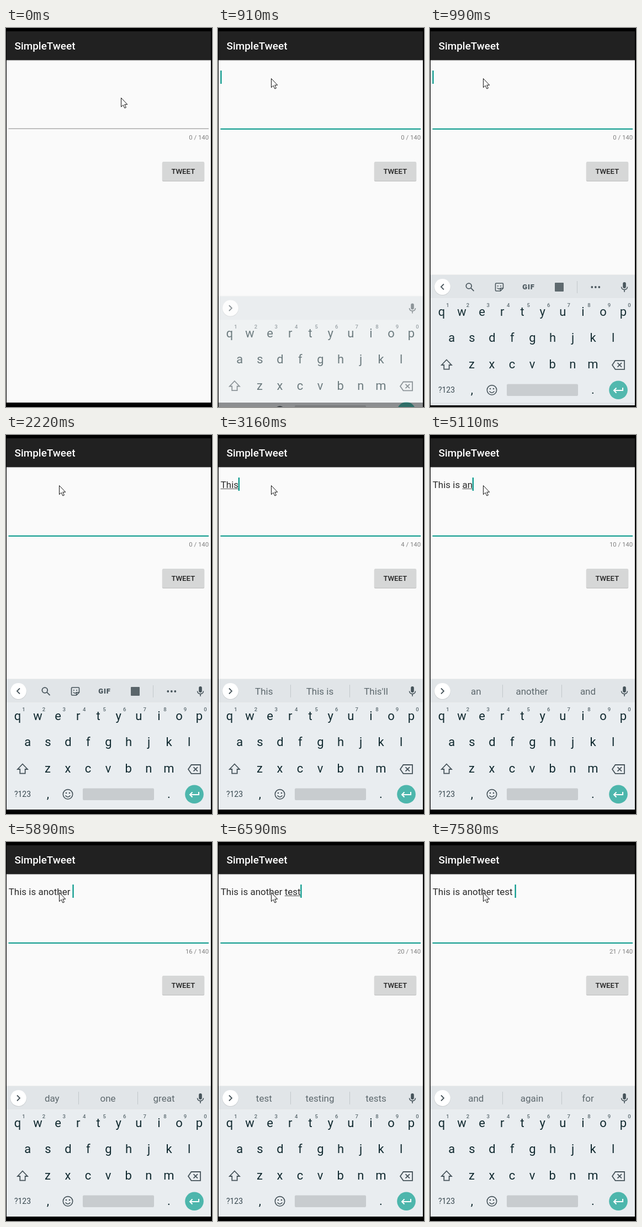
An HTML page for the animation above (8 s loop, 373x686 px).

```html
<!DOCTYPE html>
<html lang="en">
<head>
<meta charset="utf-8">
<title>Compose screen</title>
<style>
  html, body { margin: 0; width: 100%; height: 100%; overflow: hidden; background: #000; }
  svg { display: block; width: 373px; height: 686px; }
  text { font-family: Roboto, "Noto Sans", sans-serif; }
  .mid { text-anchor: middle; }
  .end { text-anchor: end; }
  .key { font-size: 22px; fill: #10292f; }
  .hint { font-size: 9.5px; font-weight: 500; fill: #59686e; }
  .word { font-size: 17px; fill: #5d686d; }
  .line { fill: none; stroke: #46535a; stroke-width: 1.8; }
  .rule { fill: none; stroke: #c2c8cb; }
</style>
</head>
<body>
<svg viewBox="0 0 373 686">
  <rect width="373" height="686"/>
  <rect x="1" y="6" width="370" height="672" fill="#fafafa"/>
  <rect x="1" y="6" width="370" height="52" fill="#212121"/>
  <rect x="1" y="58" width="370" height="1" opacity=".24"/>
  <rect x="1" y="59" width="370" height="1" opacity=".08"/>
  <text x="15.5" y="39" font-size="18.9" font-weight="500" fill="#fff">SimpleTweet</text>

  <text id="typed" x="4.7" y="95.5" font-size="17" fill="#2b2b2b"></text>
  <rect id="under" y="97" height="1" fill="#555"/>
  <rect id="caret" y="77" width="2.2" height="24" fill="#009688"/>
  <rect id="field" x="4.5" width="362.5"/>
  <text id="count" class="end" x="367" y="202" font-size="11.3" fill="#808080"></text>

  <rect x="283" y="243.5" width="76" height="34.5" rx="2" opacity=".16"/>
  <rect x="282.5" y="243" width="77" height="34" rx="2" opacity=".09"/>
  <rect x="283" y="242" width="76" height="34.5" rx="2" fill="#d6d7d7"/>
  <text class="mid" x="320.8" y="264" font-size="13.2" font-weight="500" fill="#212121">TWEET</text>

  <g id="board">
    <rect x="1" y="441" width="370" height="1" opacity=".05"/>
    <rect x="1" y="442" width="370" height="42.5" fill="#e1e5e8"/>
    <rect x="1" y="484.5" width="370" height="193.5" fill="#e9edf0"/>
    <circle cx="22.5" cy="464.3" r="14.8" opacity=".1"/>
    <circle cx="22.5" cy="463.5" r="14.4" fill="#fff"/>
    <path id="chevron" class="line"/>

    <g id="tools">
      <circle class="line" cx="70.3" cy="462" r="4.9"/>
      <path class="line" d="M74 465.7L79.5 471.2" stroke-width="2"/>
      <path class="line" d="M120 457H131Q132.500 457 132.500 458.500V466L127.500 471H120Q118.500 471 118.500 469.500V458.500Q118.500 457 120 457ZM132.500 466H127.500V471" style="stroke-width:1.6"/>
      <path class="line" d="M121.800 465.500Q125 469 128.500 465.500" style="stroke-width:1.4"/>
      <circle cx="122.800" cy="462" r="1.100" fill="#46535a"/>
      <circle cx="128" cy="462" r="1.100" fill="#46535a"/>
      <text class="mid" x="178.500" y="468" font-size="13" font-weight="900" letter-spacing=".9" fill="#46535a">GIF</text>
      <rect x="226" y="456" width="16" height="16" rx="1" fill="#5b666b"/>
      <path class="rule" d="M266.500 453V475"/>
      <g fill="#46535a">
        <circle cx="293.300" cy="464" r="1.900"/>
        <circle cx="299.800" cy="464" r="1.900"/>
        <circle cx="306.300" cy="464" r="1.900"/>
      </g>
    </g>

    <g id="words">
      <path class="rule" d="M131.500 452V475M238.500 452V475"/>
      <text class="word mid" x="83.300" y="470"></text>
      <text class="word mid" x="184.500" y="470"></text>
      <text class="word mid" x="286" y="470"></text>
    </g>

    <rect x="349.200" y="455" width="5.600" height="11" rx="2.800" fill="#46535a"/>
    <path class="line" d="M346.500 463.500Q347 468.600 352 468.600T357.500 463.500M352 468.600V473" style="stroke-width:1.600"/>

    <g id="keys"></g>
    <path class="line" d="M30 595.500L39 605H34.700V612.700H25.300V605H21Z"/>
    <path class="line" d="M335.500 597H352V612.800H335.500L330 604.900ZM339.500 601.200L347 608.700M347 601.200L339.500 608.700"/>
    <text class="mid" x="30" y="655" font-size="14" fill="#37474f">?123</text>
    <circle class="line" cx="112" cy="650.300" r="8.700" style="stroke-width:1.600"/>
    <circle cx="109" cy="648" r="1.300" fill="#46535a"/>
    <circle cx="115" cy="648" r="1.300" fill="#46535a"/>
    <path class="line" d="M107.500 652.500Q112 658 116.500 652.500" style="stroke-width:1.500"/>
    <rect x="139" y="639.500" width="129" height="21.500" rx="2" fill="#c8cccf"/>
    <circle cx="341" cy="650.300" r="16.800" fill="#4db6ac"/>
    <path d="M349 646V651H333.500M337.500 646.500L333 651L337.500 655.500" fill="none" stroke="#fff" stroke-width="2"/>
  </g>

  <path id="pointer" fill="#fff" stroke="#111" d="M.5.5V16.700L4.200 13.300L6.900 19L9.400 17.900L6.800 12.300H11.700Z"/>
</svg>

<script>
const LOOP = 8000;
const MESSAGE = 'This is another test ';

// time, characters typed, suggestions
const TYPING = [
  [0, 0, ''],
  [2310, 1, 'The|This|That'],
  [2490, 2, 'The|This|Thanks'],
  [2950, 3, 'The|This|Thanks'],
  [3010, 3, 'This|Think|Thing'],
  [3160, 4, "This|This is|This'll"],
  [3310, 5, "This|This is|This'll"],
  [3370, 5, 'is|was|one'],
  [3450, 6, 'is|in|it'],
  [3560, 7, "is|isn't|is a"],
  [3660, 8, 'the|a|my'],
  [4830, 9, 'a|and|an'],
  [5110, 10, 'an|another|and'],
  [5320, 11, 'another|an|ano'],
  [5390, 12, 'another|not|anot'],
  [5450, 13, 'another|anoth|other'],
  [5520, 13, 'another|other|anoth'],
  [5590, 14, 'another|anothe|other'],
  [5650, 15, "another|another's|other"],
  [5830, 16, "another|another's|other"],
  [5890, 16, 'day|one|great'],
  [6230, 17, 'time|thing|to'],
  [6290, 18, 'test|team|text'],
  [6470, 19, 'test|tests|testing'],
  [6590, 20, 'test|testing|tests'],
  [7520, 21, 'test|testing|tests'],
  [7580, 21, 'and|again|for']
];

// time, keyboard offset, opacity
const SLIDE = [
  [0, 0, 0],
  [910, 43.5, .6],
  [930, 27, .77],
  [960, 14, .9],
  [990, 5, .97],
  [1020, 0, 1]
];

const FOCUS = 570;
const CARET_OFF = [[0, FOCUS], [1200, 1700], [2220, 2310], [4160, 4650], [7060, 7520]];
const MOVE = { start: 30, step: 38.6, count: 14, from: [208, 126], to: [96, 91] };

const $ = id => document.getElementById(id);
const set = (el, attrs) => {
  for (const name in attrs) el.setAttribute(name, attrs[name]);
};
const at = (table, t) => table.findLast(row => row[0] <= t);
const show = (el, on) => set(el, { visibility: on ? 'visible' : 'hidden' });

function addText(label, x, y, cls) {
  const el = document.createElementNS('http://www.w3.org/2000/svg', 'text');
  set(el, { x, y, class: 'mid ' + cls });
  el.textContent = label;
  $('keys').append(el);
}

const PITCH = 36.55;
[['qwertyuiop', 21, 516], ['asdfghjkl', 39.3, 563], ['zxcvbnm', 75.5, 611]].forEach(([row, x, y]) =>
  [...row].forEach((key, i) => addText(key, x + i * PITCH, y, 'key')));
[...'1234567890'].forEach((n, i) => addText(n, 32 + i * PITCH, 500, 'hint'));
addText(',', 76, 657, 'key');
addText('.', 295, 657, 'key');

const typed = $('typed');
const words = [...$('words').querySelectorAll('text')];

function measure(n) {
  return n ? typed.getSubStringLength(0, n) : 0;
}

function drawField(t, n) {
  const text = MESSAGE.slice(0, n);
  typed.textContent = text.replace(/ /g, '\u00a0');
  const width = measure(n);
  const start = measure(text.lastIndexOf(' ') + 1);
  set($('under'), { x: 4.7 + start, width: Math.max(0, width - start) });
  set($('caret'), { x: 4.4 + width });
  show($('caret'), !CARET_OFF.some(([a, b]) => t >= a && t < b));
  set($('field'), t < FOCUS
    ? { y: 181.7, height: 1, fill: '#868686' }
    : { y: 181.8, height: 2, fill: '#009688' });
  $('count').textContent = n + ' / 140';
}

function drawBoard(t, list) {
  const [, y, opacity] = at(SLIDE, t);
  set($('board'), { transform: `translate(0 ${y})`, opacity });
  const open = t >= 960 && !list;
  show($('tools'), open);
  show($('words'), list);
  set($('chevron'), { d: open ? 'M25 458.5L20 463.5L25 468.5' : 'M20 458.500L25 463.500L20 468.500' });
  list.split('|').forEach((word, i) => words[i].textContent = word);
}

function drawPointer(t) {
  const step = Math.floor((t - MOVE.start) / MOVE.step) + 1;
  const p = Math.min(1, Math.max(0, step / MOVE.count));
  const ease = p * p * (3 - 2 * p);
  const [x, y] = MOVE.from.map((v, i) => Math.round(v + (MOVE.to[i] - v) * ease));
  set($('pointer'), { transform: `translate(${x} ${y})` });
}

function draw(t) {
  const [, n, list] = at(TYPING, t);
  drawField(t, n);
  drawBoard(t, list);
  drawPointer(t);
}

const begin = performance.now();
function tick() {
  draw((performance.now() - begin) % LOOP);
  requestAnimationFrame(tick);
}
tick();
</script>
</body>
</html>
```
